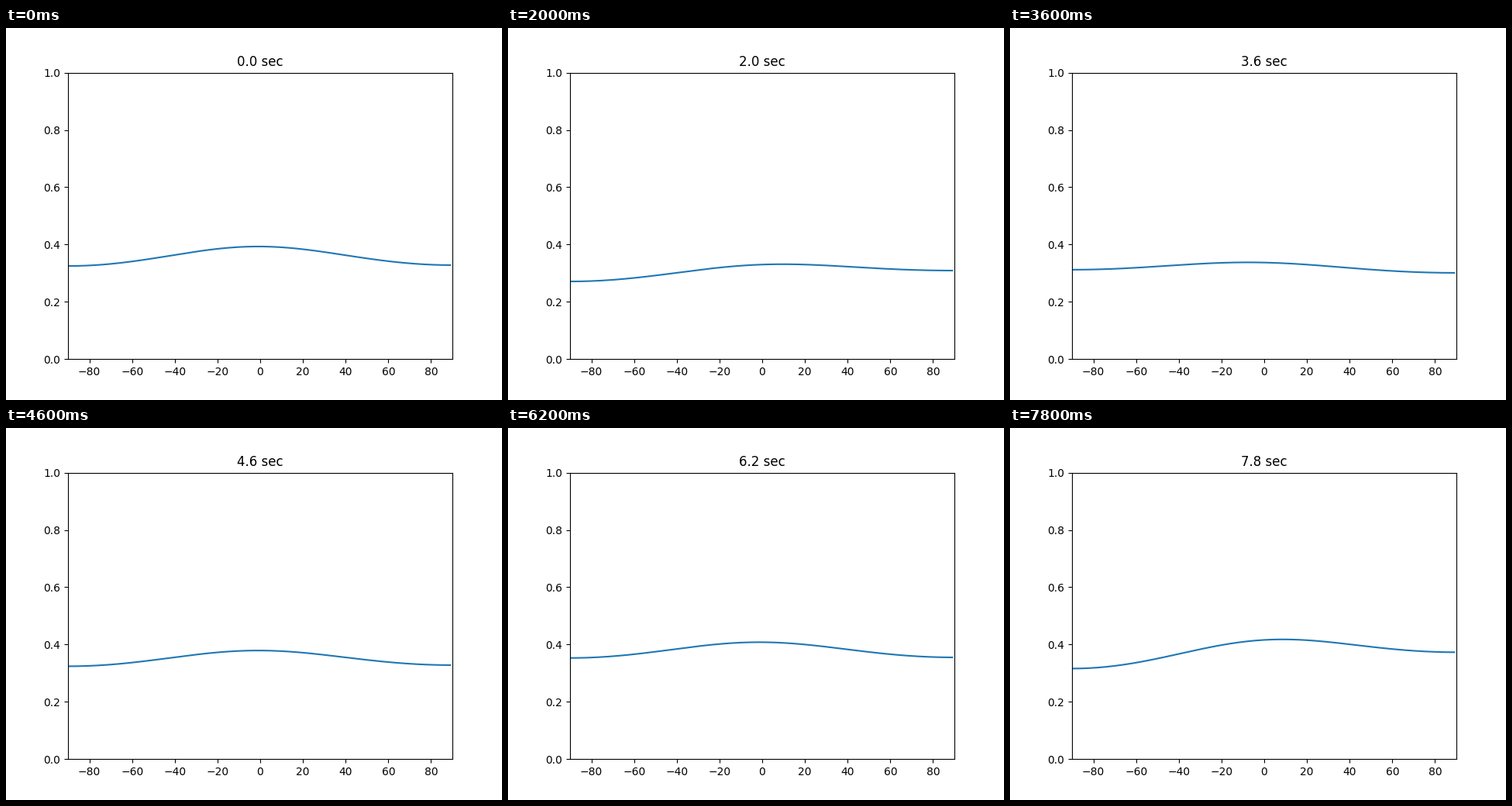
These frames come from a looping animation (640x480 px, 8 s). A matplotlib script:

```python
import numpy as np
import matplotlib.pyplot as plt
from matplotlib.animation import FuncAnimation

STEP = 200
FRAMES = 40
SKEW = -0.004

# Key moments in seconds, with the curve's height at -90, 0 and 90 degrees
TIMES = (0, 1.2, 2.0, 2.8, 3.6, 4.6, 6.2, 6.8, 7.8)
LEFT = (0.325, 0.285, 0.271, 0.302, 0.312, 0.324, 0.353, 0.271, 0.316)
MID = (0.393, 0.339, 0.330, 0.376, 0.337, 0.379, 0.408, 0.340, 0.416)
RIGHT = (0.328, 0.321, 0.309, 0.329, 0.301, 0.328, 0.355, 0.309, 0.373)

angle = np.arange(-90, 90)
s = np.sin(np.radians(angle))
bump = (1 - s**2) * (1 - 0.15 * s**2)


def response(t):
    left, mid, right = (np.interp(t, TIMES, v) for v in (LEFT, MID, RIGHT))
    base = (left + right) / 2
    tilt = (right - left) / 2
    return base + tilt * s + (mid - base) * bump + SKEW * s * (1 - s**2)


fig, ax = plt.subplots(figsize=(6.4, 4.8), dpi=100)
ax.set_xlim(-90, 90)
ax.set_ylim(0, 1)
line, = ax.plot(angle, response(0))
title = ax.set_title("0.0 sec")


def update(i):
    t = i * STEP / 1000
    line.set_ydata(response(t))
    title.set_text(f"{t:.1f} sec")
    return line, title


anim = FuncAnimation(fig, update, frames=FRAMES, interval=STEP,
                     repeat=True, repeat_delay=0, blit=False)
plt.show()
```
